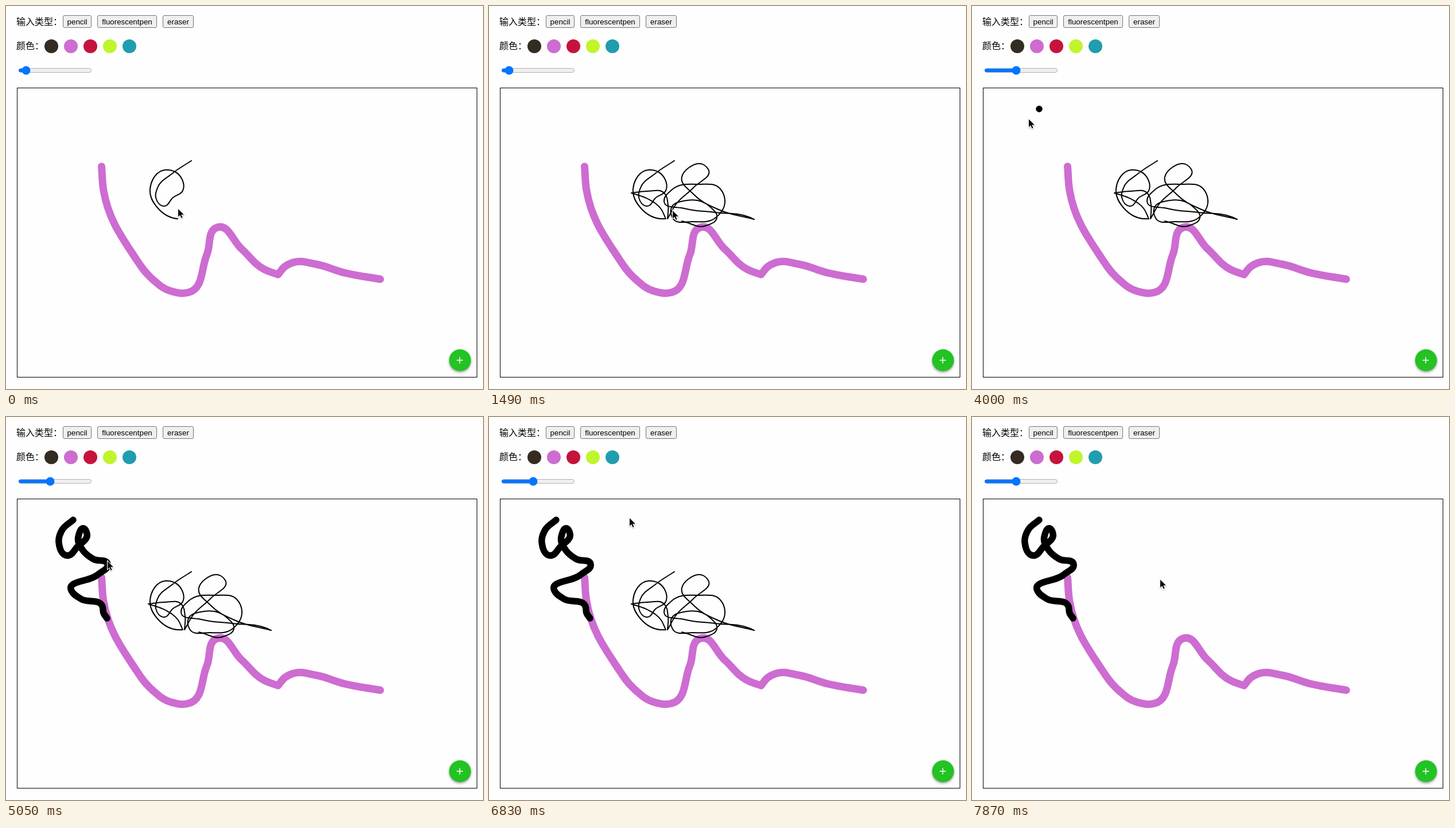
Recreate the animation shown at these times as an HTML page. Size 831 by 666 pixels, loop 8 s.

```html
<!DOCTYPE html>
<html lang="zh-CN">
<head>
<meta charset="utf-8">
<title>画板</title>
<style>
  html, body { margin: 0; width: 100%; height: 100%; overflow: hidden; background: #fefefe; }
  svg { display: block; width: 831px; height: 666px; }
  .label { font: 16px "Noto Sans CJK SC", "Noto Sans CJK", sans-serif; }
  .button rect { fill: #efefef; stroke: #767676; }
  .button.hover rect { fill: #e5e5e5; stroke: #4f4f4f; }
  .button text { font: 13.333px Arial, "Liberation Sans", sans-serif; text-anchor: middle; }
  .track { fill: #efefef; stroke: #b2b2b2; }
  .progress, .thumb { fill: #0075ff; }
  .hover .track { fill: #e5e5e5; stroke: #999; }
  .hover .progress { fill: #005cc8; }
  .ink { fill: none; stroke: #000; stroke-linecap: round; stroke-linejoin: round; }
  .add { filter: drop-shadow(0 2px 2px rgba(0, 0, 0, .4)); }
  #cursor { stroke: #fff; stroke-width: 2; paint-order: stroke; filter: drop-shadow(0 1px 1px rgba(0, 0, 0, .3)); }
</style>
</head>
<body>
<svg viewBox="0 0 831 666">
  <text class="label" x="18" y="33">输入类型：</text>
  <text class="label" x="18" y="75">颜色：</text>
  <g id="buttons"></g>
  <g id="swatches"></g>
  <g id="slider">
    <rect class="track" x="22.5" y="108.5" width="126" height="7" rx="3.5"/>
    <rect class="progress" id="progress" x="22" y="109" height="6" rx="3"/>
    <circle class="thumb" id="thumb" cy="112" r="7.5"/>
  </g>
  <rect x="19.5" y="142.5" width="801" height="503" fill="none" stroke="#000"/>
  <path class="ink" id="marker" style="stroke: #cd6cd1; stroke-width: 13"/>
  <path class="ink" id="scribble" style="stroke-width: 2"/>
  <path class="ink" id="brush" style="stroke-width: 11.5"/>
  <circle class="add" cx="791" cy="616" r="19" fill="#22c322"/>
  <path d="M785 616h11M790.5 610.5v11" stroke="#fff" stroke-width="1.5"/>
  <path id="cursor" d="M1 1v13.5l3.2-3 2.4 5.2 2-.9-2.4-5.1h4.6z"/>
</svg>
<script>
const LOOP = 8000, STEPS = 54;
const $ = id => document.getElementById(id);
const clamp = (v, low, high) => Math.min(high, Math.max(low, v));

$('buttons').innerHTML = [['pencil', 99, 50], ['fluorescentpen', 159, 104], ['eraser', 273, 54]]
  .map(([name, x, width]) => `<g class="button" id="${name}">
    <rect x="${x + .5}" y="16.5" width="${width - 1}" height="21" rx="2.5"/>
    <text x="${x + width / 2}" y="32">${name}</text></g>`).join('');
$('swatches').innerHTML = ['#342b23', '#cd6cd1', '#c6133d', '#c0f52c', '#209dae']
  .map((color, i) => `<circle cx="${79 + 34 * i}" cy="70" r="12" fill="${color}"/>`).join('');

// A round curve through key points; "|" marks a sharp turn at the point before it.
function smooth(text) {
  const runs = text.split('|').map(run => run.trim().split(/\s+/).map(p => p.split(',').map(Number)));
  const commands = [`M${runs[0][0]}l0 0`];
  runs.forEach((run, r) => {
    const points = r ? [runs[r - 1].at(-1), ...run] : run;
    const chord = i => {
      const [a, b] = [points[i], points[i + 1]];
      return a && b ? [b[0] - a[0], b[1] - a[1]] : [0, 0];
    };
    // Shorter neighbouring chords weigh more, as on a circle through three points.
    const handle = (i, length) => {
      const sum = [0, 0];
      for (const [x, y] of [chord(i - 1), chord(i)]) {
        const square = x * x + y * y || 1;
        sum[0] += x / square;
        sum[1] += y / square;
      }
      const scale = .37 * length / Math.hypot(...sum);
      return points[i].map((v, axis) => v + sum[axis] * scale);
    };
    for (let i = 1; i < points.length; i++) {
      const length = Math.hypot(...chord(i - 1));
      commands.push(`C${handle(i - 1, length)} ${handle(i, -length)} ${points[i]}`);
    }
  });
  return { commands, points: runs.flat() };
}

const marker = smooth(`166.5,279 170,321 222,433 252,472 288,496 318,498 350,432 368,385
  410,422 450,458 474,467 | 486,453 500,446 540,449 590,464 652,475`);

// Inks grow by a steady number of pieces per step, with the pointer a little ahead.
const scribble = {
  ...smooth(`323,269 290,291 264,316 261,333 275,348 291,333 308,321 306,300 278,285 251,318 265,352
    299,370 308,370 | 299,352 278,336 248,325 | 276,322 305,325 312,347 311,370 |
    327,343 356,316 382,284 374,276 347,282 336,297 356,327 400,354 462,371 |
    453,367 395,359 340,352 305,339 318,320 365,310 402,317 411,338 395,368 355,375 320,369
    317,353 345,338 385,349 397,368 378,382 336,374`),
  from: 0, until: 10, first: 11, rate: 3.4, lead: 2, erased: 50
};
const brush = {
  ...smooth(`117,179 98,196 92,218 107,241 124,226 141,203 136,194 126,208 134,232 152,247 177,256
    160,274 114,302 130,316 168,329 170,341 176,350`),
  from: 27, until: 34, first: 0, rate: 2.5, lead: 1, erased: STEPS
};

// Pointer moves between drawings: [step, x, y]
const moves = [[10, 319, 355], [15, 88, 127], [17, 39, 114], [18, 39, 114], [22, 81, 114],
  [26, 117, 176], [34, 176, 250], [38, 213, 56], [42, 295, 26], [46, 244, 175], [53, 327, 282]];

const pieces = (ink, step) => Math.floor(ink.first + ink.rate * (step - ink.from) + .01);

function drawInk(id, ink, step) {
  const visible = step >= ink.from && step < ink.erased;
  $(id).setAttribute('d', visible ? ink.commands.slice(0, pieces(ink, step) + 1).join('') : '');
}

function pointer(step) {
  const ink = [scribble, brush].find(ink => step >= ink.from && step < ink.until);
  if (ink) return ink.points[Math.min(pieces(ink, step) + ink.lead, ink.points.length - 1)];
  const next = Math.max(1, moves.findIndex(move => move[0] >= step));
  const [[t0, ...a], [t1, ...b]] = moves.slice(next - 1, next + 1);
  return a.map((v, axis) => v + (b[axis] - v) * (step - t0) / (t1 - t0));
}

function render(time) {
  const step = Math.min(STEPS - 1, Math.floor((time % LOOP + 10) / (LOOP / STEPS)));
  drawInk('scribble', scribble, step);
  drawInk('brush', brush, step);
  const thumb = 35 + 42 * clamp((step - 18) / 4, 0, 1);
  $('thumb').setAttribute('cx', thumb);
  $('progress').setAttribute('width', thumb - 22);
  $('slider').classList.toggle('hover', step >= 17 && step <= 23);
  $('eraser').classList.toggle('hover', step >= 41 && step <= 43);
  const [x, y] = pointer(step);
  $('cursor').setAttribute('transform', `translate(${x} ${y})`);
}

$('marker').setAttribute('d', marker.commands.join(''));
const start = performance.now();
function tick() {
  render(performance.now() - start);
  requestAnimationFrame(tick);
}
tick();
</script>
</body>
</html>
```
